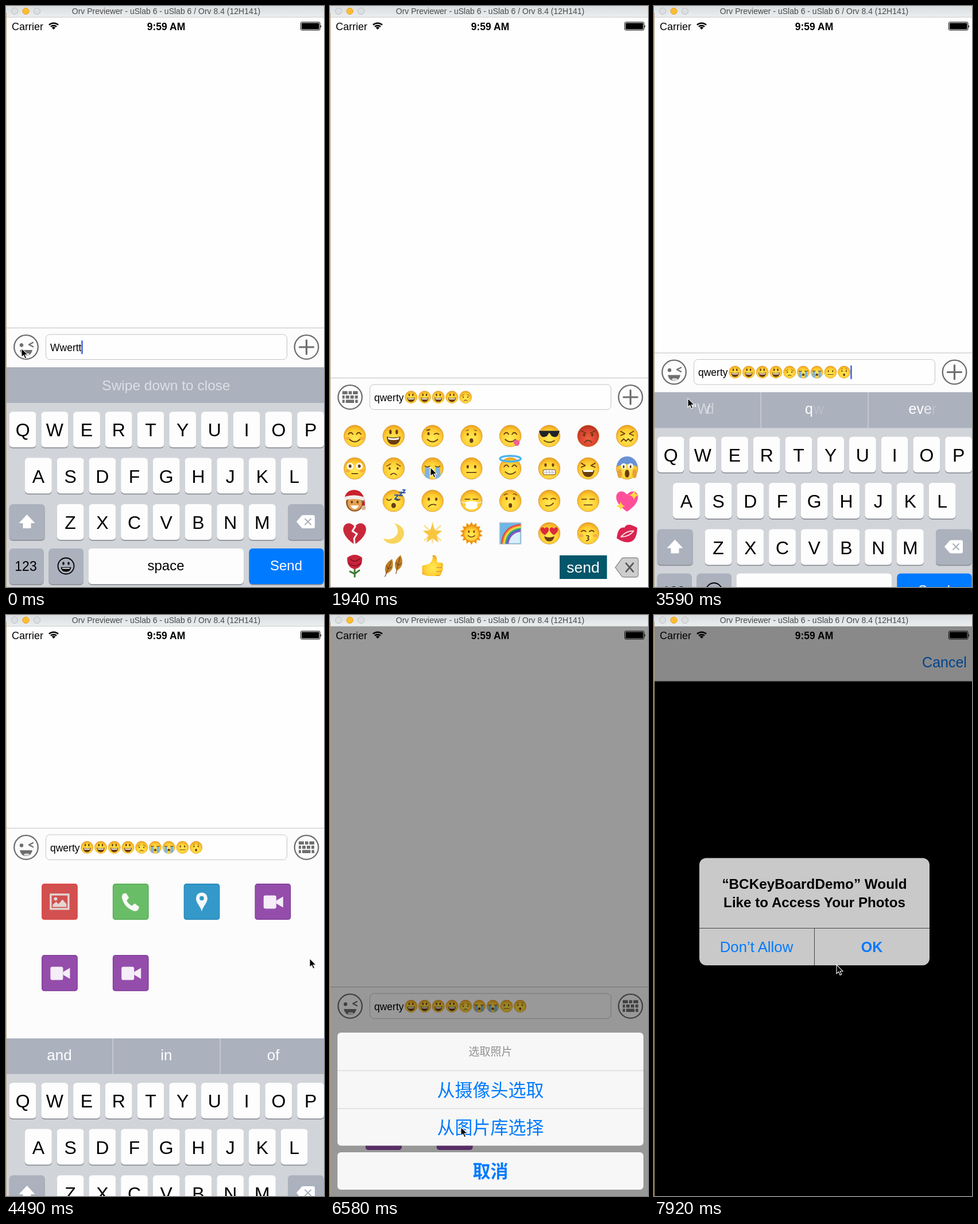
These frames come from a looping animation (554x1010 px, 8 s). An HTML page:

```html
<!DOCTYPE html>
<html lang="zh-CN">
<head>
<meta charset="utf-8">
<title>Chat keyboard</title>
<style>
html, body { margin: 0; width: 100%; height: 100%; overflow: hidden; background: #fefefe; }
svg { display: block; width: 100%; height: 100%; font-family: "Liberation Sans", Arial, sans-serif; }
.cjk { font-family: "Noto Sans CJK SC", "Noto Sans CJK", sans-serif; }
</style>
</head>
<body>
<svg id="stage" viewBox="0 0 554 1010"></svg>
<script>
const stage = document.getElementById('stage');
const BROWN = '#6b3d10', GRAY = '#6e6e6e', BLUE = '#007aff';

// markup helpers
const fill = (d, c = BROWN) => `<path d="${d}" fill="${c}"/>`;
const line = (d, c = BROWN, w = 1.8) =>
  `<path d="${d}" fill="none" stroke="${c}" stroke-width="${w}" stroke-linecap="round" stroke-linejoin="round"/>`;
const oval = (x, y, rx, ry = rx, c = BROWN) => `<ellipse cx="${x}" cy="${y}" rx="${rx}" ry="${ry}" fill="${c}"/>`;
const rect = (x, y, w, h, c, r = 0, more = '') =>
  `<rect x="${x}" y="${y}" width="${w}" height="${h}" rx="${r}" fill="${c}" ${more}/>`;
const text = (s, x, y, size, c = '#000', more = 'text-anchor="middle"') =>
  `<text x="${x}" y="${y}" font-size="${size}" fill="${c}" ${more}>${s}</text>`;
const at = (x, y, body, s = 1) => `<g transform="translate(${x} ${y}) scale(${s})">${body}</g>`;
const group = (id, body) => `<g id="${id}">${body}</g>`;
const use = (id, x, y, s = 1) => `<use href="#${id}" transform="translate(${x} ${y}) scale(${s})"/>`;
const grad = (id, a, b, c) => `<radialGradient id="${id}" cy=".62" r=".66"><stop offset="0" stop-color="${a}"/>
  <stop offset=".6" stop-color="${b}"/><stop offset="1" stop-color="${c}"/></radialGradient>`;

// emoji
const face = (body, c = 'url(#yellow)') =>
  `<circle r="18.7" fill="${c}" stroke="#c9851c" stroke-width=".7"/>` + body;
const eyes = (x = 6.5, y = -4, rx = 2, ry = 2.8, c = BROWN) => oval(-x, y, rx, ry, c) + oval(x, y, rx, ry, c);
const happyEyes = line('M-11-3q4-6 8 0M3-3q4-6 8 0');
const flatEyes = line('M-11-3h8M3-3h8');
const smileLine = line('M-9 6q9 8 18 0');
const frown = line('M-6 11q6-7 12 0');
const heart = (c, s) => at(0, 0, fill('M0 17C-32-4-12-25 0-10C12-25 32-4 0 17z', c), s);
const spark = (x, y, s) => at(x, y, fill('M0-8Q1-1 8 0Q1 1 0 8Q-1 1-8 0Q-1-1 0-8z', '#ffd83d'), s);
const cheeks = eyes(12, 4, 4, 2.6, '#f58a4b88');
const petals = (n, len, c) => Array.from({ length: n }, (_, i) =>
  `<path d="M-5-11L0-${len}L5-11z" fill="${c}" transform="rotate(${i * 360 / n})"/>`).join('');
const leaf = (x, y, a) => `<g transform="translate(${x} ${y}) rotate(${a})">` +
  fill('M0-17Q13-1 0 11Q-12-1 0-17z', '#c08128') + line('M0-12V16M0 2l4-5M0 2l-4-5', '#7a4616', 1.2) + '</g>';

const emoji = {
  blush: face(cheeks + happyEyes + smileLine),
  smile: face(eyes(5.5, -7, 2.2, 4) + fill('M-12 1q12 3 24 0Q11 15 0 15T-12 1z') + fill('M-10 2.5q10 3 20 0l-1 3.5q-9 2-18 0z', '#fff')),
  wink: face(oval(-7, -4, 2, 2.8) + line('M3-3q4-3 8 0M-10-10l5-1') + smileLine),
  oh: face(eyes(6.5, -3, 1.8, 2.6) + line('M-9-9l4-1.5M5-10.5l4 1.5', BROWN, 1.2) + oval(0, 8, 3.2, 4)),
  yum: face(happyEyes + smileLine + fill('M4 9q10-6 12 2q0 7-7 6z', '#ee5f94')),
  cool: face(fill('M-18-9h36l-3 8q-4 5-11 1L0-6l-4 6q-7 4-11-1z', '#202329') + line('M-9 8q9 6 18 0')),
  angry: face(eyes(7, -2, 2, 3) + line('M-12-9l8 4M12-9l-8 4') + frown, 'url(#red)'),
  confounded: face(line('M-11-8l7 4-7 3M11-8l-7 4 7 3M-10 9l4-4 4 4 4-4 4 4 4-4')),
  flushed: face(cheeks + eyes(8, -4, 6, 6, '#fff') + eyes(8, -4, 2.5) + line('M-5 9h10')),
  sad: face(eyes(7, 0, 1.8, 2.2) + line('M-12-4l7-4M12-4l-7-4', BROWN, 1.4) + line('M-5 11q5-5 10 0')),
  cry: face(fill('M-13-2h8v20q-6-1-9-5zM13-2h-8v20q6-1 9-5z', '#82b4dc') + line('M-13-4q4 3 8 0M5-4q4 3 8 0') + fill('M-4 11q0-7 4-7t4 7z')),
  neutral: face(eyes(6.5, -3) + line('M-8 7h16')),
  halo: face(happyEyes + smileLine) + `<ellipse cy="-17" rx="18" ry="5" fill="none" stroke="#4bb4ed" stroke-width="3.5"/>`,
  grimace: face(eyes(6.5, -6) + rect(-11, 2, 22, 9, '#fff', 3, `stroke="${BROWN}"`) + line('M-11 6.5h22M-5 2v9M0 2v9M5 2v9', '#aaa', 1)),
  laugh: face(line('M-12-9l7 4-7 3M12-9l-7 4 7 3') + fill('M-11 3h22Q9 15 0 15T-11 3z') + fill('M-9 3h18l-1 3H-8z', '#fff')),
  scream: face(fill('M-18-3A18 18 0 0 1 18-3Q0-12-18-3z', '#6b91d5') + eyes(6, -4, 4.5, 5, '#fff') + eyes(6, -3, 1.5) +
    oval(0, 9, 4, 7) + eyes(13, 9, 4, 8, '#e9a13a')),
  santa: oval(0, 3, 15, 15.5, '#8d4f20') + oval(0, 4, 12.5, 12.5, '#e3a253') + eyes(5, 2, 1.7, 2.4) + fill('M-7 8H7Q5 14 0 14T-7 8z', '#fff') +
    fill('M-18-5Q-14-20 1-19Q18-17 18 10L13 9L16-5z', '#c8202b') + fill('M-18-7Q0-13 17-6L16 0Q0-6-17-1z', '#f1ece8') + oval(15.5, 12, 4, 4, '#d9b59a'),
  sleep: face(line('M-12-3q4 4 8 0M3-3q4 4 8 0') + oval(0, 8, 4, 4.5)) + line('M2-10h6l-6 7h6M10-15h5l-5 6h5M16-19h4l-4 5h4', '#2953a8', 2),
  confused: face(eyes(6.5, -3) + line('M-7 10q5-6 13-3')),
  mask: face(flatEyes + line('M-17 2L-9 4M17 2L9 4', '#eee') + fill('M-10 2q10-3 20 0v10q-10 6-20 0z', '#fff')),
  hushed: face(eyes(6.5, -4, 1.9, 2.7) + line('M-11-10q3-3 6-2M11-10q-3-3-6-2', BROWN, 1.3) + oval(0, 8, 3, 4)),
  smirk: face(line('M-11-3q4-3 8 0M3-3q4-3 8 0M-6 8q8 2 13-4')),
  blank: face(flatEyes + line('M-7 7h14')),
  sparkling: heart('#ff4f9a', 1.1) + spark(-11, 9, 1) + spark(12, -10, 1.1),
  broken: heart('#c9283b', 1.15) + line('M1-12l-5 8 8 5-5 8 1 10', '#fdfdfd', 3),
  moon: fill('M1-18Q20-12 18 3Q13 19-4 18Q-15 16-18 9Q0 14 7 0Q9-10 1-18z', '#f8d45c'),
  star: line('M-14-13L14 12M14-13L-14 12M0-18V16', '#fae3a0', 3) + at(0, 0, fill('M0-19L5-6 19-5 8 4 12 18 0 10-12 18-8 4-19-5-5-6z', '#f8c540'), .88),
  sun: petals(14, 20, '#f0920f') + `<circle r="13" fill="url(#yellow)"/>` + eyes(4.5, -3, 1.5, 2) + line('M-6 4q6 5 12 0', BROWN, 1.5),
  rainbow: rect(-18.5, -18.5, 37, 37, '#6fb6e6', 0, 'stroke="#b5c3ca" stroke-width="1.5"') + fill('M-13 17Q-9-9 17-13V17z', '#d9f0fa') +
    ['#e84040', '#f79a2c', '#f7e13f', '#49b84c', '#4065cf', '#9052bc'].map((c, i) =>
      line(`M${-15 + i * 2.2} 17Q${-12 + i * 2.2} ${-12 + i * 2.2} 17 ${-15 + i * 2.2}`, c, 2.4)).join(''),
  hearteyes: face(at(-8, -4, heart('#de2a3c', .42)) + at(8, -4, heart('#de2a3c', .42)) + fill('M-9 5q9 4 18 0-2 9-9 9T-9 5z')),
  kiss: face(cheeks + line('M-12-3q4-4 8 0M2-3q4-4 8 0M-3 4q7 0 2 4q5 3-2 5')),
  lips: `<g transform="rotate(-25)">` + fill('M-20 0Q-9-18 0-11Q9-18 20-1Q11 17 0 16T-20 0z', '#d92350') + line('M-12 1Q0-5 12 1Q0 7-12 1', '#f9d8e0', 2) + '</g>',
  rose: line('M0 2V19M0 14l-8-4M0 14l8-6', '#3c7a33', 3) + fill('M-13-14Q0-24 13-14Q14 3 0 6Q-14 3-13-14z', '#c92338') + line('M-8-12q8 8 16 0M-11-5q11 10 22 0', '#84152a', 1.8),
  leaves: leaf(8, -2, 14) + leaf(-9, 4, 22),
  thumb: fill('M-18 0L-6-3Q2-10 0-18Q8-21 8-6L17-5Q20 0 17 3Q20 8 16 10Q16 17 10 18H-8L-18 15z', 'url(#yellow)') +
    line('M17 3H7M16 10H7M12 17H6', '#d3912b', 1.2)
};
const names = Object.keys(emoji);
const typed = ['smile', 'smile', 'smile', 'smile', 'sad', 'cry', 'cry', 'neutral', 'oh'];

// round bar icons
const ring = body => `<circle r="20.8" fill="none" stroke="${GRAY}" stroke-width="2.3"/>` + body;
const winkIcon = ring(oval(-8, -3.5, 3.2, 3.2, GRAY) + line('M12-8L5-4.5 12-.8', GRAY, 2.3) +
  fill('M-11 5H11Q9 15 0 15T-11 5z', GRAY) + oval(1, 12.5, 5, 2, '#d8d8d8'));
const bricks = [[-13.5, 9, -2.5, 5.5, 5, 8.5], [-13.5, 4, -7.5, 6, .5, 6, 8.5, 5], [-13.5, 4, -7.5, 14.5, 9, 4.5]];
const keyIcon = ring(bricks.map((row, r) => row.map((x, i) =>
  i % 2 ? '' : rect(x, -10.5 + r * 7.5, row[i + 1], 5.6, GRAY, .6)).join('')).join(''));
const plusIcon = ring(line('M-12 0H12M0-12V12', GRAY, 3.2));

const bar = rect(1, 0, 553, 1010, '#fcfcfc') + rect(1, 0, 553, 1.2, '#c9c9cc') +
  rect(69.5, 12, 420, 43.5, '#fefefe', 7, 'stroke="#c4c4c6"') +
  at(35, 34, group('leftWink', winkIcon) + group('leftKeys', keyIcon)) +
  at(523.5, 34, group('rightPlus', plusIcon) + group('rightKeys', keyIcon)) +
  `<text id="draft" x="77" y="40.5" font-size="17.5"></text>` +
  typed.map((n, i) => group('typed' + i, use(n, 141.2 + i * 23.75, 34, .57))).join('') +
  `<rect id="caret" y="22.5" width="2.6" height="23.5" fill="#4169e8"/>`;

// keyboard
const key = (x, y, w, c, body) => rect(x, y + 1.8, w, 62, '#8c9097', 6) + rect(x, y, w, 62, c, 6) + body;
const keyRow = (s, x, y) => [...s].map((ch, i) =>
  key(x + i * 55.72, y, 46.8, '#fdfdfd', text(ch, x + i * 55.72 + 23.4, y + 43, 32))).join('');
const dark = '#abb1bd';
const backspace = (c, cross, edge = 'none') =>
  `<path d="M-16 0L-7-10.5Q-6-11.5-4-11.5H13Q16-11.5 16-8.5V8.5Q16 11.5 13 11.5H-4Q-6 11.5-7 10.5z" fill="${c}" stroke="${edge}"/>` +
  line('M-1-5l10 10M9-5L-1 5', cross, 2);
const thirds = words => words.map((w, i) => text(w, 93 + 186.3 * i, 37.5, 26, '#fff')).join('');
const dividers = rect(185.5, 0, 1.2, 62, '#d3d6db') + rect(372.5, 0, 1.2, 62, '#d3d6db');
const fade = (s, x, o) => text(s, x, 37.5, 25, '#fff', `opacity="${o}"`);
const keyboard = rect(1, 0, 553, 390, '#d1d4d9') + rect(1, 0, 553, 62, dark) +
  group('hint', text('Swipe down to close', 279, 40, 24.5, '#dde0e5')) +
  group('blend', dividers + fade('“', 66, .85) + fade('W', 75, .5) + fade('d', 91, .4) +
    fade('q', 263, 1) + fade('w', 278, .18) + fade('ev', 443.5, 1) + fade('e', 470, .75) + fade('r', 484, .2)) +
  group('words', dividers + thirds(['and', 'in', 'of'])) +
  keyRow('QWERTYUIOP', 5.7, 77.3) + keyRow('ASDFGHJKL', 33, 157.5) + keyRow('ZXCVBNM', 88.7, 238) +
  key(5.7, 238, 62, dark, at(36.5, 269, fill('M0-13L14 2H7V11H-7V2H-14z', '#fff'))) +
  key(491, 238, 62.5, dark, at(522, 268.5, backspace('#fff', dark))) +
  key(5.7, 315, 60, dark, text('123', 34.5, 354, 23)) +
  key(74.5, 315, 60.5, dark, at(104.5, 345.5, `<circle r="14" fill="none" stroke="#000" stroke-width="1.8"/>` +
    eyes(4.5, -4.5, 1.8, 2.8, '#000') + fill('M-9 2H9Q8 10 0 10T-9 2z', '#000') + fill('M-7 3.2H7L6 5H-6z', '#fff'))) +
  key(143.5, 315, 270.5, '#fdfdfd', text('space', 278.5, 352.5, 24)) +
  key(423.5, 315, 130, BLUE, text('Send', 488, 352.5, 24, '#fff'));

const emojiPanel = names.map((n, i) => use(n, 43 + (i % 8) * 67.8, 32.5 + (i >> 3) * 56.4)).join('') +
  rect(400, 240, 82.5, 41, '#04566b') + text('send', 441, 270, 26.5, '#fff') +
  at(517, 261, backspace('#cdcdcd', '#555', '#8d8d8d'), '1.25 1.45');

// attachment tiles
const camera = rect(-16, -11, 22, 23, '#f5edf7', 3) + fill('M6-2L18-9V10L6 3z', '#f5edf7');
const photo = `<rect x="-15.5" y="-12.5" width="31" height="25" fill="none" stroke="#e3d5d3" stroke-width="3.4"/>` +
  oval(-7, -5, 3, 3, '#e3d5d3') + fill('M-12 9V5l6-5 4 4 7-8 7 8v5z', '#e3d5d3');
const phone = fill('M-13-14l5-1 5 8-4 5q3 6 9 9l5-4 8 6-2 5q-4 4-10 1Q-11 9-15-6q-1-5 2-8z', '#f7fbf6');
const pin = fill('M0 17C-2 8-10 2-10-6A10 10 0 0 1 10-6C10 2 2 8 0 17z', '#f3f8fb') + oval(0, -6, 3.8, 3.8, '#3498c9');
const tiles = [['#d2504f', '#e04240', photo], ['#6abd67', '#4da84d', phone], ['#3498c9', '#1f80b4', pin],
  ...Array(3).fill(['#944dab', '#7d3698', camera])];
const addPanel = tiles.map(([c, edge, icon], i) => at(62.2 + (i % 4) * 123.8, 28.2 + (i >> 2) * 124,
  rect(.5, .5, 61.5, 61.5, c, 4, `stroke="${edge}" stroke-width="1.2"`) + at(31.2, 31.2, icon))).join('');

// action sheet, picker, alert
const cjk = (s, y, size, c, w) => text(s, 279.5, y, size, c, `class="cjk" text-anchor="middle" font-weight="${w}"`);
const sheet = rect(13, 726, 533, 196.5, '#f7f7f7', 6) + rect(13, 934, 533, 65, '#f7f7f7', 6) +
  rect(13, 791.5, 533, 1, '#d0cdd2') + rect(13, 857.5, 533, 1, '#d0cdd2') +
  cjk('选取照片', 766, 19, '#8f8f8f', 400) + cjk('从摄像头选取', 837, 31, BLUE, 400) +
  cjk('从图片库选择', 902, 31, BLUE, 400) + cjk('取消', 978, 31, BLUE, 700);
const picker = rect(1, 20, 553, 95, '#fbfbfb') + rect(1, 114.5, 553, 1, '#b2b2b2') + text('Cancel', 506, 91, 25, BLUE);
const bold = 'text-anchor="middle" font-weight="bold"';
const alertBox = rect(79, 422.5, 401, 186.5, '#fff', 12, 'id="alertBack"') + group('alertText',
  text('“BCKeyBoardDemo” Would', 279.5, 475.5, 24.3, '#000', bold) +
  text('Like to Access Your Photos', 279.5, 508, 24.2, '#000', bold) +
  text('Don’t Allow', 178.5, 586, 25.8, BLUE) + text('OK', 379.5, 586, 25, BLUE, bold)) +
  group('alertLines', rect(79, 544, 401, 1, '#444') + rect(279, 544, 1, 65, '#444'));

const arc = r => `M${-r * .7} ${-r * .7}A${r} ${r} 0 0 1 ${r * .7} ${-r * .7}`;
const status = text('Carrier', 10, 41.5, 18, '#000', '') +
  at(83, 41, `<path d="${arc(11.5)}${arc(7.2)}" fill="none" stroke="#000" stroke-width="2.5"/>` + fill('M0 0L-3.3-3.5Q0-6 3.3-3.5z', '#000')) +
  text('9:59 AM', 279, 41.5, 17.5, '#000', bold) +
  rect(513.5, 28, 33.5, 14, 'none', 2, 'stroke="#000"') + rect(515, 29.5, 30.5, 11, '#000', 1) + fill('M548 33q2.5 2 0 5z', '#000');
const title = rect(0, 0, 554, 20, 'url(#chrome)') + rect(0, 19, 554, 1, '#cbced0') +
  [15, 34.5, 54].map((x, i) => `<circle cx="${x}" cy="9" r="5.6" fill="${i === 1 ? '#fdbd2e' : '#dcdfe1'}" stroke="${i === 1 ? '#e2a12a' : '#bcc0c3'}"/>`).join('') +
  text('Orv Previewer - uSlab 6 - uSlab 6 / Orv 8.4 (12H141)', 279, 14, 14, '#4b4b4b');
const pointer = `<path d="M0 0V15.5L3.6 12.2 6.2 18 8.8 16.8 6.2 11.2H11z" fill="#000" stroke="#fff" stroke-width="1.1"/>`;

stage.innerHTML = `<defs>${grad('yellow', '#ffec57', '#ffcd32', '#ea9a1c')}${grad('red', '#ee5f42', '#da4230', '#a92a20')}
  <linearGradient id="chrome" x2="0" y2="1"><stop stop-color="#d9dde0"/><stop offset="1" stop-color="#eceeef"/></linearGradient>
  ${names.map(n => group(n, emoji[n])).join('')}</defs>` +
  rect(0, 0, 554, 1010, '#fefefe') +
  group('bar', bar) + group('emojiPanel', emojiPanel) + group('addPanel', addPanel) + group('keyboard', keyboard) +
  rect(1, 20, 553, 990, '#000', 0, 'id="black"') + group('picker', picker) +
  rect(1, 20, 553, 990, '#000', 0, 'id="dim"') + group('sheet', sheet) + group('alert', alertBox) +
  status + title + rect(0, 12, 1, 998, '#b8a07c') + group('pointer', pointer);

const el = {};
stage.querySelectorAll('[id]').forEach(n => el[n.id] = n);
const show = (id, on) => el[id].setAttribute('display', on ? 'inline' : 'none');
const move = (id, x, y) => el[id].setAttribute('transform', `translate(${x} ${y})`);
const set = (id, name, v) => el[id].setAttribute(name, v);

// linear track through [step, value] points
function track(k, pts, col = 1) {
  const i = pts.findIndex(p => p[0] > k);
  if (i < 0) return pts[pts.length - 1][col];
  if (i === 0) return pts[0][col];
  const a = pts[i - 1], b = pts[i];
  return a[col] + (b[col] - a[col]) * (k - a[0]) / (b[0] - a[0]);
}

const LOOP = 8000, STEPS = 54;
const pointerPath = [[0, 27, 595], [2, 28, 597], [8, 94, 738], [9, 98, 741], [11, 99, 742], [12, 112, 798], [13, 175, 802],
  [15, 177, 798], [16, 178, 797], [18, 243, 796], [20, 245, 745], [22, 34, 680], [23, 36, 682], [24, 59, 682], [28, 520, 592],
  [30, 529, 597], [32, 480, 640], [35, 106, 762], [37, 108, 752], [38, 110, 758], [42, 215, 885], [44, 228, 890],
  [45, 228, 890], [46, 230, 880], [49, 231, 792], [53, 318, 608]];
const barPath = [[0, 559], [1, 583], [2, 618], [3, 646], [22, 646], [23, 639], [24, 602.5], [25, 566], [26, 559],
  [29, 559], [30, 370], [31, 532], [32, 646]];
const sheetPath = [[35, 0], [36, .42], [37, .834], [38, 1], [45, 1], [46, .6], [47, .1], [48, 0]];
const pickerPath = [[46, 990], [47, 700], [48, 330], [49, 80], [50, 0]];
const alertPath = [[48, 0, 1.2, 0, 0], [49, .3, 1.147, .42, .133], [50, .8, 1.04, .68, .37], [51, 1, 1, .788, .455]];
const typedAt = [9, 10, 11, 12, 13, 15, 16, 18, 20];

const stepStart = k => 150 * k - 10 * ((k >= 8) + (k >= 37) + (k >= 49));
function stepAt(t) {
  let k = STEPS - 1;
  while (k > 0 && stepStart(k) > t) k--;
  return k;
}

function draw(k) {
  const y = track(k, barPath);
  const keys = k === 0 || (k >= 23 && k < 30);
  const emojis = k > 0 && k < 23;

  move('bar', 0, y);
  move('emojiPanel', 0, y + 69);
  move('addPanel', 0, y + 69);
  move('keyboard', 0, keys ? y + 69 : track(k, [[30, 736], [31, 895], [32, 1010]]));
  show('emojiPanel', emojis);
  show('addPanel', k >= 30);
  show('keyboard', keys || k === 30 || k === 31);
  show('hint', k === 0);
  show('blend', k === 23 || k === 24);
  show('words', k >= 25);

  const leftKeys = k > 0 && k < 22;
  show('leftKeys', leftKeys);
  show('leftWink', !leftKeys);
  show('rightKeys', k >= 30);
  show('rightPlus', k < 30);
  el.draft.textContent = k === 0 ? 'Wwertt' : 'qwerty';
  typedAt.forEach((s, i) => show('typed' + i, k >= s));
  show('caret', keys);
  set('caret', 'x', k === 0 ? 131.2 : 342.2);

  const up = track(k, sheetPath);
  show('sheet', up > 0);
  move('sheet', 0, 284 * (1 - up));
  show('picker', k >= 47);
  move('picker', 0, track(k, pickerPath));
  show('black', k >= 50);

  const [alpha, scale, back, shade] = [1, 2, 3, 4].map(c => track(k, alertPath, c));
  show('alert', alpha > 0);
  set('alert', 'transform', `translate(279.5 515.8) scale(${scale}) translate(-279.5 -515.8)`);
  set('alertBack', 'opacity', back);
  set('alertText', 'opacity', alpha);
  set('alertLines', 'opacity', alpha * alpha);
  set('dim', 'opacity', Math.max(.4 * up, shade));
  move('pointer', track(k, pointerPath), track(k, pointerPath, 2));
}

const start = performance.now();
function tick() {
  draw(stepAt((performance.now() - start) % LOOP));
  requestAnimationFrame(tick);
}
tick();
</script>
</body>
</html>
```
